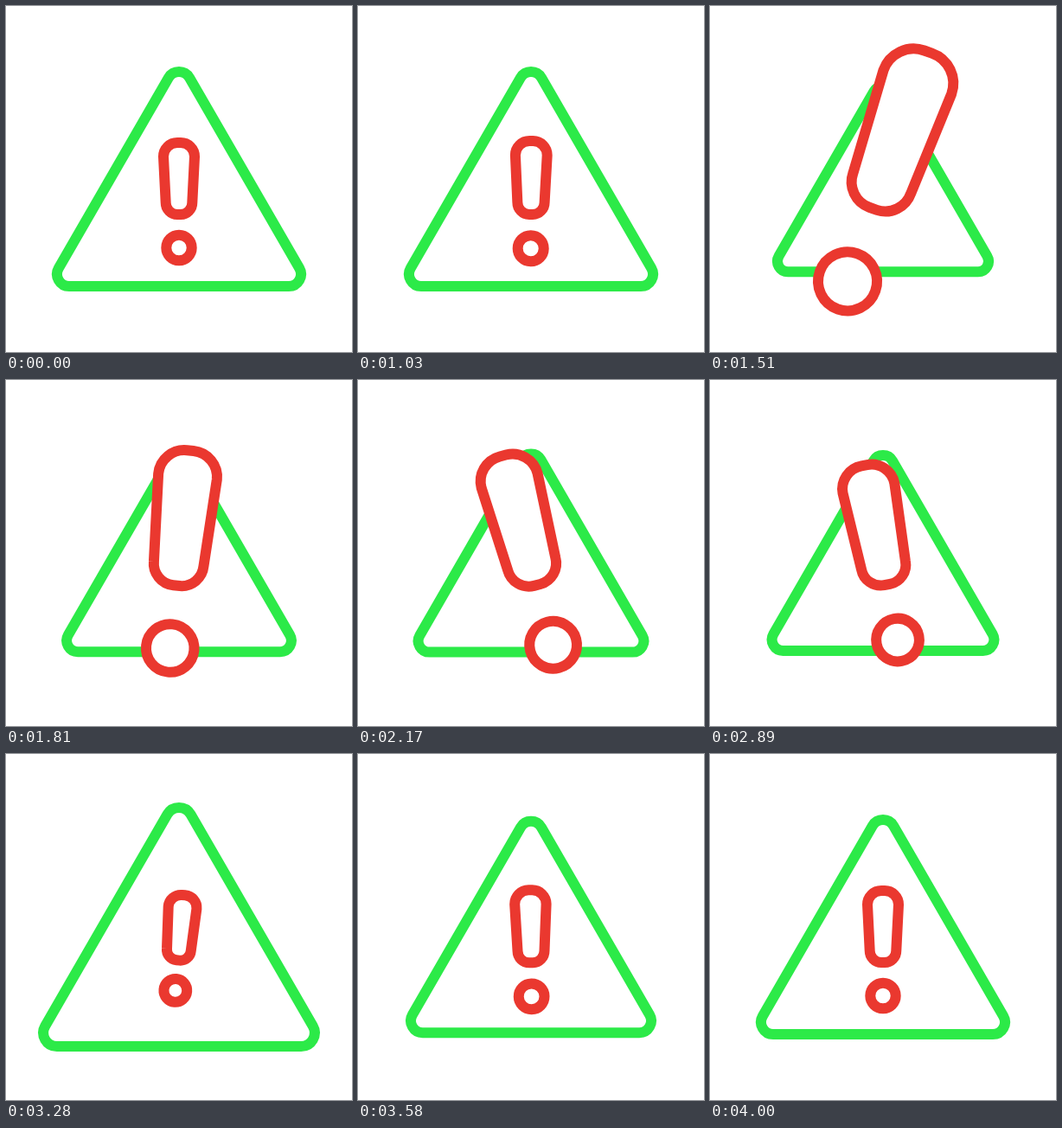
Animation of 400x400 px, one loop 4.03 s. Source, as an HTML page:

```html
<!DOCTYPE html>
<html lang="en">
<head>
<meta charset="utf-8">
<title>Warning</title>
<style>
  html, body { margin: 0; width: 100%; height: 100%; overflow: hidden; background: #fff; }
  svg { display: block; width: 100%; height: 100%; }
  path, circle { fill: #fff; stroke-width: 12; vector-effect: non-scaling-stroke; }
  #triangle { stroke: #2cea48; }
  #mark { stroke: #ea382f; }
</style>
</head>
<body>
<svg viewBox="0 0 400 400">
  <path id="triangle"/>
  <!-- drawn around the centre of the exclamation mark -->
  <g id="mark">
    <path d="M-18-52A16 16 0 0 1-2-68H2A16 16 0 0 1 18-52L15.3 1.5A13.5 13.5 0 0 1 2 15H-2A13.5 13.5 0 0 1-15.3 1.5Z"/>
    <circle cy="53.5" r="14.7"/>
  </g>
</svg>
<script>
  const LOOP = 4030, STEP = 30, START = 1030;
  const SWING = 20.5;

  const triangle = document.getElementById('triangle');
  const mark = document.getElementById('mark');

  // Smooth 0 to 1 between two times
  function ease(time, from, to) {
    const u = Math.min(1, Math.max(0, (time - from) / (to - from)));
    return u * u * (3 - 2 * u);
  }

  // Smooth 0 to 1 and back to 0
  function bump(time, from, to) {
    const middle = (from + to) / 2;
    return ease(time, from, middle) - ease(time, middle, to);
  }

  // Overshoot that builds up while the pulse ends, then settles to rest
  const rebound = (time, from, peak) =>
    ease(time, from, peak) - 1.15 * ease(time, peak, 3620) + 0.15 * ease(time, 3620, 4000);

  // Two pulses: full size is reached twice, with a dip between
  const pulse = (time, from, full, release, end, dip) =>
    ease(time, from, full) - ease(time, release, end) - dip * bump(time, 1400, 2600);

  function poseTriangle(time) {
    const squeeze = pulse(time, 1030, 1470, 2760, 3215, 0.58);
    const scale = 1 - 0.142 * squeeze + 0.122 * rebound(time, 2760, 3215);
    triangle.setAttribute('transform', `translate(200 200) scale(${scale})`);
  }

  function poseMark(time) {
    const zoom = pulse(time, 1000, 1400, 2610, 3200, 0.46);
    const bounce = rebound(time, 2610, 3200);
    const swing = ease(time, 1000, 1410) - 2 * ease(time, 1410, 2400) + ease(time, 2660, 3240);
    const y = 226 - 25.5 * zoom - 1.3 * bounce;
    const angle = SWING * swing + 5.5 * bounce;
    const scale = 1 + 1.37 * zoom - 0.1 * bounce;
    mark.setAttribute('transform', `translate(200 ${y}) rotate(${angle}) scale(${scale})`);
  }

  // Equilateral triangle with rounded corners, centred on its bounding box
  function trianglePath() {
    const r = 14, half = 127, top = -110, bottom = 110;
    const dx = r * Math.sqrt(3) / 2, dy = r / 2;
    const arc = (x, y) => `A${r} ${r} 0 0 1 ${x} ${y}`;
    return `M${-dx} ${top - dy}${arc(dx, top - dy)}` +
           `L${half + dx} ${bottom - dy}${arc(half, bottom + r)}` +
           `H${-half}${arc(-half - dx, bottom - dy)}Z`;
  }

  function tick() {
    const elapsed = performance.now() % LOOP;
    const time = elapsed < START ? 0 : START + Math.floor((elapsed - START) / STEP) * STEP;
    poseTriangle(time);
    poseMark(time);
    requestAnimationFrame(tick);
  }

  triangle.setAttribute('d', trianglePath());
  tick();
</script>
</body>
</html>
```
